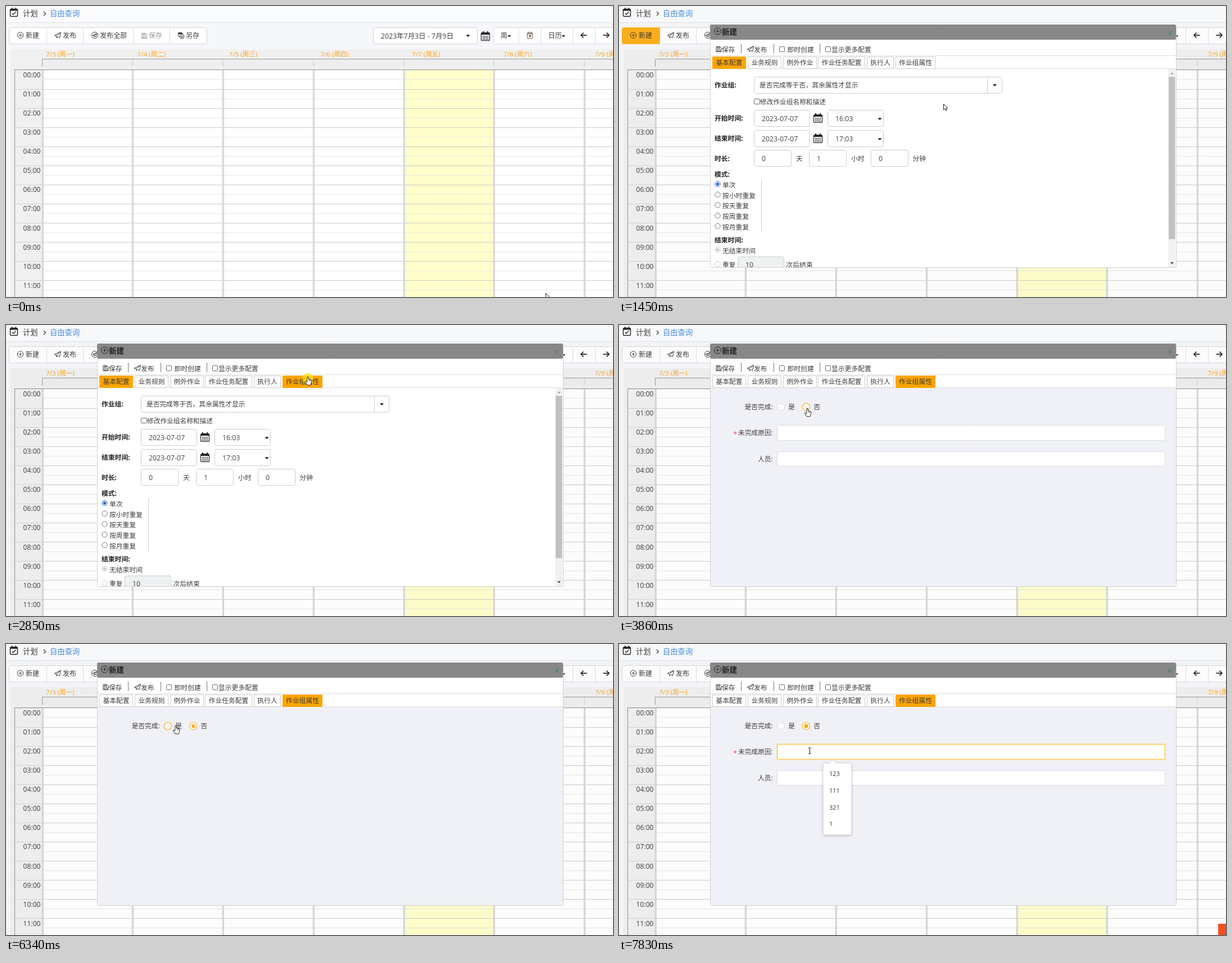
An HTML page with a canvas for the animation above (8000 ms loop, 1080x518 px).

```html
<!DOCTYPE html>
<html lang="zh">
<head>
<meta charset="utf-8">
<title>计划</title>
<style>
html, body { margin: 0; width: 100%; height: 100%; overflow: hidden; background: #f6f7fb; }
canvas { display: block; width: 1080px; height: 518px; }
</style>
</head>
<body>
<canvas id="stage" width="1080" height="518"></canvas>
<script>
const g = document.getElementById('stage').getContext('2d');
const LOOP = 8000;
const FONT = '"Open Sans","Noto Sans CJK SC","Noto Sans CJK",sans-serif';
const ORANGE = '#ffa500', INK = '#3c3c3c', EDGE = '#ccc';
const clamp = v => Math.max(0, Math.min(1, v));
const ease = v => v * v * (3 - 2 * v);

// ---- drawing helpers; text is placed by its vertical centre ----
function text(s, x, y, size = 11.8, color = INK, weight = 400, align = 'left') {
  g.font = `${weight} ${size}px ${FONT}`;
  g.textAlign = align;
  g.fillStyle = color;
  g.fillText(s, x, y + size * 0.37);
}
function rect(x, y, w, h, color) { g.fillStyle = color; g.fillRect(x, y, w, h); }
function box(x, y, w, h, r, fill, stroke, lw = 1) {
  g.beginPath();
  g.roundRect(x + 0.5, y + 0.5, w - 1, h - 1, r);
  if (fill) { g.fillStyle = fill; g.fill(); }
  if (stroke) { g.strokeStyle = stroke; g.lineWidth = lw; g.stroke(); }
}
function circle(x, y, r, fill, stroke, lw = 1) {
  g.beginPath();
  g.arc(x, y, r, 0, Math.PI * 2);
  if (fill) { g.fillStyle = fill; g.fill(); }
  if (stroke) { g.strokeStyle = stroke; g.lineWidth = lw; g.stroke(); }
}
function poly(x, y, pts, fill, stroke, lw = 1, closed = true) {
  g.beginPath();
  for (let i = 0; i < pts.length; i += 2) g.lineTo(x + pts[i], y + pts[i + 1]);
  if (closed) g.closePath();
  if (fill) { g.fillStyle = fill; g.fill(); }
  if (stroke) { g.strokeStyle = stroke; g.lineWidth = lw; g.stroke(); }
}
const line = (x, y, pts, color = INK, lw = 1) => poly(x, y, pts, null, color, lw, false);
const caret = (x, y, s = 3.5, c = '#222') => poly(x, y, [-s, -s / 2, s, -s / 2, 0, s / 2 + 0.5], c);

// ---- icons ----
function plus(x, y, r, c = INK) {
  circle(x, y, r, null, c);
  line(x, y, [-r / 2, 0, r / 2, 0], c);
  line(x, y, [0, -r / 2, 0, r / 2], c);
}
function plane(x, y, s = 1, c = INK) {
  const p = [-6, 0.5, 5.5, -5, 3.5, 4.5, -0.5, 2.5, -2, 5, -2.5, 1.5].map(v => v * s);
  poly(x, y, p, null, c);
  line(x, y, [-2.5 * s, 1.5 * s, 5.5 * s, -5 * s], c);
}
function floppy(x, y, c = INK) {
  poly(x, y, [-4.5, -4.5, 2.5, -4.5, 4.5, -2.5, 4.5, 4.5, -4.5, 4.5], null, c);
  g.strokeRect(x - 2.5, y - 4, 4, 2.5);
  g.strokeRect(x - 2.5, y + 1, 5, 3);
}
function calendar(x, y, c = '#222') {
  box(x, y + 2, 16, 15, 2, null, c, 1.2);
  rect(x + 1, y + 3, 14, 3, c);
  rect(x + 3, y, 2, 4, c);
  rect(x + 11, y, 2, 4, c);
  for (let i = 0; i < 12; i++) rect(x + 3 + (i % 4) * 2.8, y + 8 + (i >> 2) * 2.8, 1.7, 1.6, c);
}
function arrow(x, y, d) {
  line(x, y, [-5 * d, 0, 5.5 * d, 0], '#222', 1.7);
  line(x, y, [1 * d, -4.5, 5.5 * d, 0, 1 * d, 4.5], '#222', 1.7);
}

// ---- calendar page ----
const days = ['7/3 (周一)', '7/4 (周二)', '7/5 (周三)', '7/6 (周四)', '7/7 (周五)', '7/8 (周六)', '7/9 (周日)'];
function page(newActive) {
  rect(0, 0, 1080, 518, '#f6f7fb');
  rect(0, 0, 1080, 29, '#fafbfd');
  rect(0, 29, 1080, 1, '#dfe1e7');
  box(7, 5, 14, 14, 2, null, '#222', 1.4);
  rect(7, 6, 14, 2.5, '#222');
  rect(10, 3, 1.6, 4, '#222');
  rect(16.5, 3, 1.6, 4, '#222');
  line(14, 13, [-3, 0, -1, 2, 3.5, -2.5], '#222', 1.4);
  text('计划', 30, 13, 13.3);
  line(69, 13.5, [-2, -3.5, 1.5, 0, -2, 3.5], '#333', 1.2);
  text('自由查询', 78, 13, 13.3, '#4a90e2');

  box(5, 38, 353, 30, 3, '#fff', '#d8d8d8');
  for (const x of [72, 137, 227, 291]) rect(x, 39, 1, 28, '#ddd');
  if (newActive) box(5, 38, 68, 30, 3, '#ffb01c', '#ffb01c');
  plus(25.5, 52, 5.2);
  text('新建', 35, 53, 12);
  plane(92, 52);
  text('发布', 101, 53, 12);
  circle(158, 52, 5.5, null, INK);
  plane(158, 52, 0.6);
  text('发布全部', 167, 53, 12);
  floppy(246, 53, '#999');
  text('保存', 254, 53, 12, '#999');
  box(306, 47, 8, 8, 1, null, INK);
  rect(306, 47, 7, 3, INK);
  box(309, 50, 8, 8, 1, '#fff', INK);
  rect(311, 53, 4, 1, INK);
  rect(311, 55, 4, 1, INK);
  text('另存', 320, 53, 12);

  box(653, 38, 186, 30, 3, '#fff', '#d0d0d0');
  text('2023年7月3日 - 7月9日', 667, 53.5, 12.4);
  caret(822, 53);
  calendar(845, 45);
  box(867, 38, 230, 30, 3, '#fff', '#d8d8d8');
  for (const x of [912, 951, 1008, 1048]) rect(x, 39, 1, 28, '#ddd');
  text('周', 880, 53, 12);
  caret(895.5, 53.5, 3.2);
  box(927, 47, 10, 11, 1, null, '#654');
  rect(927, 49, 10, 1.3, '#654');
  rect(929, 45.5, 1, 3, '#654');
  rect(934, 45.5, 1, 3, '#654');
  rect(930.5, 52, 3.5, 3, '#654');
  text('日历', 965, 53, 12);
  caret(992, 53.5, 3.2);
  arrow(1028.5, 52, -1);
  arrow(1067.5, 52, 1);

  rect(8, 77, 1072, 441, '#f0f0f0');
  rect(64, 94, 1016, 14, '#eee');
  rect(64, 94, 1016, 1, '#999');
  rect(64, 94, 1, 14, '#999');
  days.forEach((d, i) => text(d, 71 + i * 162.8, 86, 11.6, '#ffa319'));
  rect(66, 114, 1014, 404, '#fff');
  rect(709, 114, 159, 404, '#ffffcc');
  for (let k = 0; k < 12; k++) {
    const y = Math.floor(113 + k * 34.07);
    rect(66, y + (k ? 18 : 17), 1014, 1, '#e6e6e3');
    if (k) {
      rect(66, y + 1, 1014, 1, '#cbcbcb');
      rect(15, y + 1, 49, 1, '#d2d2d2');
    }
    const hour = String(k).padStart(2, '0') + ':00';
    text(hour, 61.5, 122.5 + k * 34.07, 12.1, INK, 400, 'right');
  }
  for (let k = 0; k < 7; k++) {
    const x = Math.floor(64 + k * 160.75);
    rect(x, 114, 3, 404, '#e9e9e9');
    rect(x, 114, 1, 404, '#c6c6c6');
    rect(x + 2, 114, 1, 404, '#cfcfcf');
    if (k) rect(x, 95, 2, 13, '#ddd');
  }
  rect(15, 113, 1065, 1, '#8e8e8e');
  rect(15, 113, 1, 405, '#8e8e8e');
}

// ---- dialog ----
const tabs = [['基本配置', 166, 226], ['业务规则', 229, 289], ['例外作业', 292, 352],
  ['作业任务配置', 354, 438], ['执行人', 441, 489], ['作业组属性', 492, 563]];

function spinner(t) {
  const head = Math.floor((t - 760) / 83);
  for (let i = 0; i < 9; i++) {
    const a = (head - i - 3) * Math.PI / 6;
    circle(575.5 + 19.3 * Math.cos(a), 262.5 + 19.3 * Math.sin(a), 3.4 - i * 0.36, '#70dcf0');
  }
}
function dialogFrame() {
  box(162, 33, 830, 433, 2, '#f8f8f8', '#d0d0d0');
  box(162, 33, 829, 27, 2, '#888', '#888');
  plus(175.5, 45, 6, '#222');
  text('新建', 183, 46, 13.5, '#222', 700);
  line(980, 48, [-3.5, -3.5, 3.5, 3.5], '#2b7d60');
  line(980, 48, [-3.5, 3.5, 3.5, -3.5], '#2b7d60');
}
function toolbar(active, hover) {
  rect(163, 60, 828, 52, '#fff');
  floppy(177.5, 77);
  text('保存', 183, 77.5);
  for (const x of [217, 275, 357]) rect(x, 67, 1, 17, '#777');
  plane(234, 76.5);
  text('发布', 240, 77.5);
  box(285, 72, 10, 10, 1, '#fff', '#666');
  text('即时创建', 299.5, 78);
  box(367, 72, 10, 10, 1, '#fff', '#666');
  text('显示更多配置', 378, 78);
  rect(163, 88, 828, 1, '#ddd');
  rect(163, 111, 828, 1, '#ddd');
  tabs.forEach(([name, x, end], i) => {
    const on = i === active || i === hover;
    box(x, 90, end - x, 22, 0, on ? ORANGE : '#fff', on ? ORANGE : EDGE);
    text(name, (x + end) / 2, 101, 11.8, INK, 400, 'center');
  });
}
function input(x, y, w, h, value, fill = '#fff') {
  box(x, y, w, h, 3, fill, EDGE);
  text(value, x + 14, y + h / 2, 12.3, '#444');
}
function option(y, name, on, off) {
  const c = off ? '#ccc' : on ? '#2d6cc0' : '#777';
  circle(175.5, y, 4.7, '#fff', c);
  if (on) circle(175.5, y, 2.8, c);
  text(name, 184, y + 1.5);
}
function form() {
  rect(163, 112, 828, 353, '#fff');
  text('作业组:', 170, 141, 11.8, '#222', 700);
  box(240, 126, 442, 30, 3, '#fff', EDGE);
  rect(655, 127, 1, 28, EDGE);
  caret(668.5, 141);
  text('是否完成等于否，其余属性才显示', 250, 141, 11.7);
  box(240, 165, 11, 10, 1, '#fff', '#666');
  text('修改作业组名称和描述', 251, 171, 11.7);
  [['开始时间:', 185, '16:03'], ['结束时间:', 221, '17:03']].forEach(([name, y, time]) => {
    text(name, 170, y + 15, 11.8, '#222', 700);
    input(240, y, 100, 30, '2023-07-07');
    calendar(346, y + 6);
    input(371, y, 100, 30, time);
    caret(464, y + 16);
  });
  text('时长:', 170, 271.5, 11.8, '#222', 700);
  [[240, '0', 315, '天'], [338, '1', 413, '小时'], [448, '0', 522.5, '分钟']].forEach(([x, v, ux, unit]) => {
    input(x, 256, 67, 30, v);
    text(unit, ux, 271.5);
  });
  text('模式:', 170, 300, 11.8, '#222', 700);
  ['单次', '按小时重复', '按天重复', '按周重复', '按月重复'].forEach((s, i) => option(317 + i * 18.7, s, i === 0));
  rect(253, 309, 1, 93, EDGE);
  text('结束时间:', 170, 417, 11.8, '#222', 700);
  option(434, '无结束时间', true, true);
  option(459.5, '重复', false, true);
  input(211, 446, 83, 29, '10', '#eef1f2');
  text('次后结束', 297.5, 460.5);
  rect(977, 112, 13, 353, '#f1f1f1');
  rect(978, 126, 11.5, 289, '#c1c1c1');
  poly(984, 120, [-3, 1.5, 3, 1.5, 0, -2], '#a5a5a5');
  caret(984, 457.5, 3, '#444');
}

// ---- attribute tab: [time, chosen radio] ----
const clicks = [[3800, 1], [4500, 0], [5000, 1], [6300, 0], [6860, 1]];
const spots = [288, 333];
const OPEN_FORM = 1150, SWITCH = 2930, READY = 3040, FOCUS = 7300;

function attributes(t, cur) {
  rect(163, 112, 828, 353, '#f0f1f6');
  if (t < READY) return spinner(t);
  const done = clicks.filter(c => c[0] <= t);
  const [when, pick] = done.length ? done[done.length - 1] : [0, -1];
  const k = clamp((t - when) / 220);
  text('是否完成:', 273.5, 146, 11.7, INK, 400, 'right');
  spots.forEach((x, i) => {
    const on = pick === i;
    const grow = on ? ease(k) : done.length > 1 ? 1 - ease(k) : 0;
    const hover = Math.abs(cur.x - x) < 14 && cur.y < 158;
    if (on) circle(x, 146, 7.6, 'rgba(255,190,60,.28)');
    circle(x, 146, 6.5, '#fff', on || grow > 0.1 ? '#ffab1a' : hover ? '#ffd28a' : '#dcdce0', 1.1);
    if (grow > 0.05) circle(x, 146, 3.4 * grow, '#ffa50f');
    text(i ? '否' : '是', x + 13.3, 146, 11.8);
  });
  if (pick === 1) fields(t);
}
function fields(t) {
  const focus = t >= FOCUS;
  text('*', 203, 194, 13, '#ff4d4f');
  text('未完成原因:', 273.5, 192, 11.7, INK, 400, 'right');
  box(281, 178, 691, 28, 2, '#fff', focus ? '#ffd166' : '#dcdce0', focus ? 2 : 1);
  text('人员:', 273.5, 239, 11.7, INK, 400, 'right');
  box(281, 225, 691, 27, 2, '#fff', '#dcdce0');
  if (!focus) return;
  if (t < 7830) rect(291, 184, 1, 16, '#222');
  if (t < 7370) return;
  g.save();
  g.shadowColor = 'rgba(0,0,0,.3)';
  g.shadowBlur = 5;
  g.shadowOffsetY = 1;
  box(363, 212, 51, 128, 3, '#fff');
  g.restore();
  poly(381, 212, [-6, 1, 0, -6, 6, 1], '#fff');
  line(381, 212, [-6, 0, 0, -6, 6, 0], '#d5d5d5');
  ['123', '111', '321', '1'].forEach((s, i) => text(s, 374, 231 + i * 29.8, 11));
}

// ---- pointer: [time, x, y] ----
const path = [[70, 960, 511], [420, 65, 62], [765, 65, 62], [830, 185, 90], [1450, 577, 174],
  [1700, 577, 174], [1850, 638, 165], [2110, 262, 98], [2470, 537, 92], [3310, 537, 92],
  [3690, 335, 148], [4170, 335, 148], [4430, 294, 146], [4580, 294, 146], [4850, 335, 148],
  [5020, 335, 148], [5560, 296, 146], [5800, 296, 146], [5880, 311, 146], [6110, 311, 146],
  [6210, 302, 145], [6400, 302, 145], [6740, 335, 148], [6980, 335, 148], [7240, 339, 190]];

function pointerAt(t) {
  let i = path.findIndex(p => p[0] > t);
  if (i < 0) i = path.length;
  const a = path[Math.max(0, i - 1)], b = path[Math.min(i, path.length - 1)];
  const k = a === b ? 0 : ease(clamp((t - a[0]) / (b[0] - a[0])));
  return { x: a[1] + (b[1] - a[1]) * k, y: a[2] + (b[2] - a[2]) * k };
}
function pointer(t, { x, y }, hand) {
  const press = t > 2550 && t < SWITCH || clicks.some(c => t > c[0] - 50 && t < c[0]);
  if (press) circle(x, y + 3, 9.5, 'rgba(255,228,20,.75)');
  if (t > 7150) {
    line(x, y, [-2.5, -5.5, -0.5, -5, 0.5, -5, 2.5, -5.5], '#222');
    line(x + 0.5, y, [0, -5, 0, 5], '#222');
    line(x, y, [-2.5, 5.5, -0.5, 5, 0.5, 5, 2.5, 5.5], '#222');
  } else if (hand) {
    poly(x, y, [-1, 0.5, 1, 0.5, 1.6, 5, 4, 5.3, 6.5, 6.5, 7, 8, 6, 12, 5, 15, -1, 15,
      -4.5, 9.5, -4, 8, -1.3, 9.5], '#fff', '#222');
    line(x, y, [2, 6, 2, 8.5], '#222', 0.7);
    line(x, y, [4.3, 6, 4.3, 8.5], '#222', 0.7);
  } else {
    poly(x, y, [0.5, 0.5, 0.5, 11, 3, 8.8, 4.6, 12.3, 6.2, 11.5, 4.7, 8.2, 8, 8], '#fff', '#222');
  }
}

function draw(t) {
  const cur = pointerAt(t);
  g.clearRect(0, 0, 1080, 518);
  page(t > 380 && t < 2560);
  let hover = -1;
  if (t >= 560) {
    const k = ease(clamp((t - 560) / 190));
    const s = 0.5 + 0.5 * k;
    rect(0, 0, 1080, 518, `rgba(0,0,0,${0.01 * k})`);
    g.save();
    g.globalAlpha = k;
    g.translate(576.5, 249.5);
    g.scale(s, s);
    g.translate(-576.5, -249.5);
    dialogFrame();
    g.beginPath();
    g.rect(162, 60, 830, 405);
    g.clip();
    if (t < OPEN_FORM) {
      spinner(t);
    } else {
      if (cur.y > 88 && cur.y < 110) hover = tabs.findIndex(b => cur.x >= b[1] && cur.x <= b[2]);
      toolbar(t < SWITCH ? 0 : 5, hover);
      if (t < SWITCH) form();
      else attributes(t, cur);
    }
    g.restore();
  }
  if (t >= 7400) rect(1066, 498, 14, 20, '#f4511e');
  const overRadio = t > 3500 && cur.y < 160 && cur.x > 280 && cur.x < 360;
  pointer(t, cur, hover >= 0 || overRadio);
}

function tick(now) {
  draw(now % LOOP);
  requestAnimationFrame(tick);
}
draw(0);
requestAnimationFrame(tick);
</script>
</body>
</html>
```
